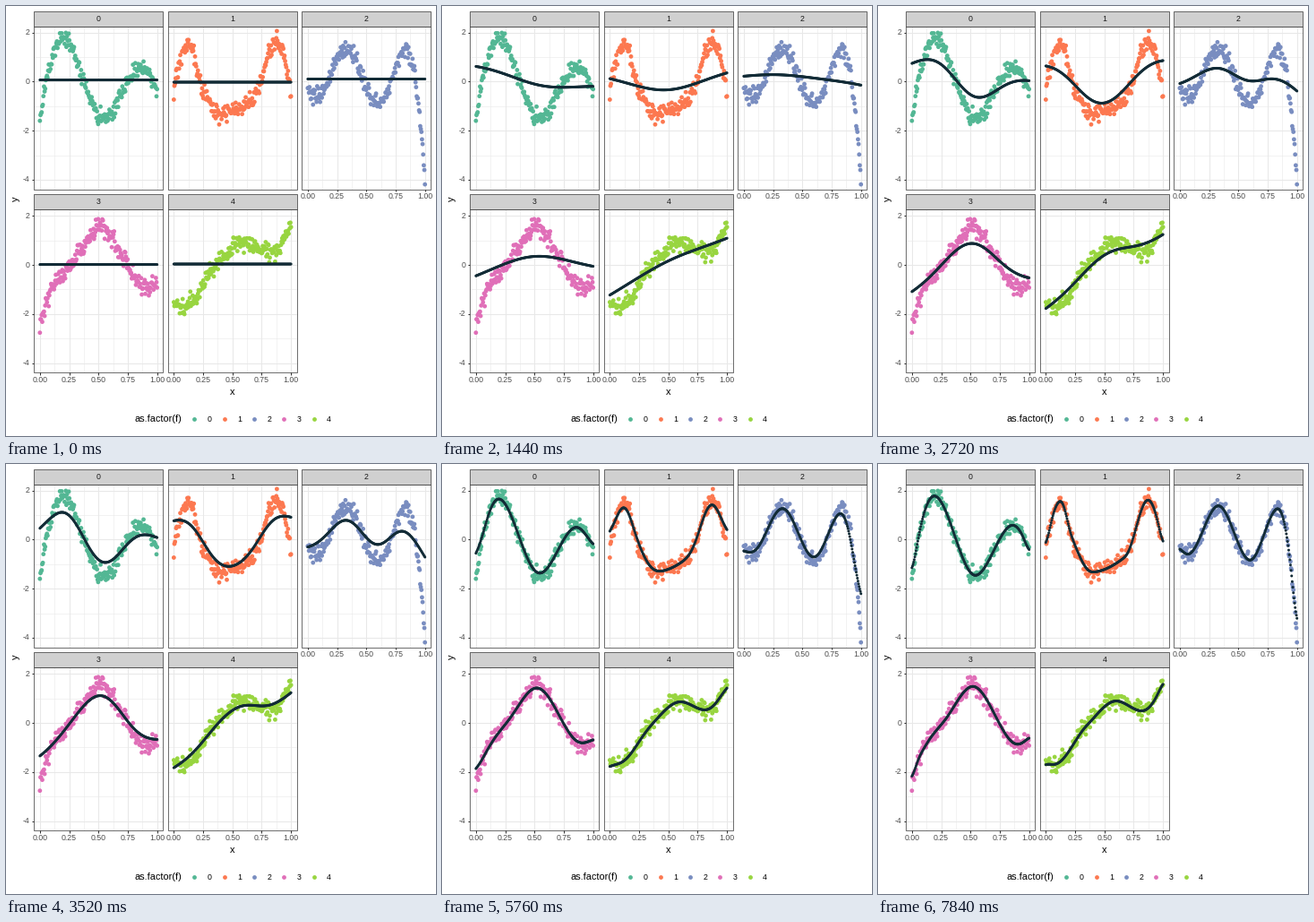
Write a matplotlib script that moves like this. It is 480x480 px and loops after 8000 ms.

```python
import numpy as np
import matplotlib.pyplot as plt
from matplotlib.animation import FuncAnimation
from matplotlib.patches import Rectangle

SIZE, DPI = 480, 100
PT = 72 / DPI                      # points per pixel
FRAMES, STEP = 50, 160
N = 200

LEFT, TOP = 31.3, 22.6             # first panel's corner
PANEL_W, PANEL_H, STRIP_H = 143.9, 181.9, 17.1
PITCH_X, PITCH_Y = 149.5, 204.7
UNIT_X, UNIT_Y = PANEL_W / 1.1, 27.4
ZERO_X, ZERO_Y = PANEL_W / 22, 61.7

INK, LABEL, GRID = "#333333", "#4d4d4d", "#e8e8e8"
STRIP, CURVE = "#d0d0d0", "#122b36"
COLORS = ["#53b794", "#fc7850", "#798dc0", "#e06fb8", "#98d540"]

plt.rcParams["font.family"] = "Liberation Sans"
rng = np.random.default_rng(7)
xs = np.linspace(0, 1, N)


def bend(*points):
    """Smooth curve that turns only at the given points."""
    kx, ky = np.array(points).T
    h = np.diff(kx)
    d = np.diff(ky) / h
    m = np.r_[2 * d[0], np.zeros(len(d) - 1), 2 * d[-1]]
    for i in range(1, len(d)):
        if d[i - 1] * d[i] > 0:
            m[i] = 2 / (1 / d[i - 1] + 1 / d[i])
    i = np.clip(np.searchsorted(kx, xs) - 1, 0, len(h) - 1)
    u = (xs - kx[i]) / h[i]
    ease = u * u * (3 - 2 * u)
    pull = h[i] * u * (1 - u) * ((1 - u) * m[i] - u * m[i + 1])
    return ky[i] + ease * (ky[i + 1] - ky[i]) + pull


signals = np.array([
    bend((0, -1.6), (.19, 1.8), (.54, -1.48), (.86, .6), (1, -.6)),
    bend((0, -.5), (.13, 1.62), (.22, .1), (.39, -1.33), (.68, -.7), (.87, 1.65), (1, -.45)),
    bend((0, -.3), (.07, -.62), (.33, 1.4), (.6, -.87), (.84, 1.3), (1, -4)),
    bend((0, -2.45), (.12, -.9), (.28, .1), (.52, 1.5), (.9, -.88), (1, -.55)),
    bend((0, -1.65), (.07, -1.7), (.35, -.1), (.6, .9), (.82, .48), (1, 1.7)),
])
clouds = signals + np.clip(rng.normal(0, 0.19, signals.shape), -0.42, 0.42)

means = signals.mean(axis=1, keepdims=True)
slopes, starts = np.polyfit(xs, signals.T, 1)
trends = starts[:, None] + slopes[:, None] * xs


def fits_at(t):
    """Learned curves at t seconds: flat, then coarse, then detailed."""
    width = 0.2 * np.exp((2.08 - t) / 2.4)
    kernel = np.exp(-0.5 * ((xs[:, None] - xs) / width) ** 2)
    kernel /= kernel.sum(axis=1, keepdims=True)
    coarse = trends + (signals - trends) @ kernel.T
    u = min(t / 2.08, 1)
    return means + u * u * (3 - 2 * u) * (coarse - means)


fig = plt.figure(figsize=(SIZE / DPI, SIZE / DPI), dpi=DPI, facecolor="white")
ax = fig.add_axes([0, 0, 1, 1])
ax.set_xlim(0, SIZE)
ax.set_ylim(SIZE, 0)
ax.axis("off")


def text(x, y, s, size=8.8, color="black", **kw):
    opts = dict(ha="center", va="center", zorder=6) | kw
    ax.text(x, y, s, fontsize=size * PT, color=color, **opts)


def line(x, y, color, width):
    ax.plot(x, y, color=color, lw=width * PT, solid_capstyle="butt", zorder=1)


def dots(x, y, color, size, z):
    # One colour per dot keeps the dots off the whole-pixel grid.
    return ax.scatter(x, y, s=(size * PT) ** 2, c=[color] * len(x), lw=0, zorder=z)


def box(x, y, w, h, fill, z):
    ax.add_patch(Rectangle((x, y), w, h, fc=fill, ec=INK, lw=0.7 * PT, zorder=z))


def draw_panel(k):
    """Draws one facet and returns its curve and its origin."""
    row, col = divmod(k, 3)
    left, top = LEFT + col * PITCH_X, TOP + row * PITCH_Y
    right, bottom = left + PANEL_W, top + PANEL_H
    x0, y0 = left + ZERO_X, top + ZERO_Y

    for i in range(9):
        x = x0 + i / 8 * UNIT_X
        line([x, x], [top, bottom], GRID, 0.55 if i % 2 else 1.07)
    for v in range(-4, 3):
        y = y0 - v * UNIT_Y
        line([left, right], [y, y], GRID, 0.55 if v % 2 else 1.07)

    if col == 0:
        for v in (2, 0, -2, -4):
            y = y0 - v * UNIT_Y
            line([left - 2.75, left], [y, y], INK, 1.07)
            text(left - 5, y, str(v), color=LABEL, ha="right")
    if k >= 2:
        for i in range(5):
            x = x0 + i / 4 * UNIT_X
            line([x, x], [bottom, bottom + 2.75], INK, 1.07)
            text(x, bottom + 8.4, f"{i / 4:.2f}", color=LABEL)

    px = x0 + xs * UNIT_X
    dots(px, y0 - clouds[k] * UNIT_Y, COLORS[k], 4.8, 2)
    curve = dots(px, np.full(N, y0), CURVE, 3, 3)
    box(left, top, PANEL_W, PANEL_H, "none", 4)
    box(left, top - STRIP_H, PANEL_W, STRIP_H, STRIP, 5)
    text((left + right) / 2, top - STRIP_H / 2, str(k), color="#1a1a1a")
    return curve, px, y0


panels = [draw_panel(k) for k in range(5)]

text(253, 431, "x", 11)
text(11, 215, "y", 11, rotation=90)
text(143, 461.5, "as.factor(f)", 11, ha="left")
for k, c in enumerate(COLORS):
    dots([210.3 + k * 33.3], [461], c, 4.8, 2)
    text(227 + k * 33.3, 461, str(k))


def update(frame):
    for (curve, px, y0), fit in zip(panels, fits_at(frame * STEP / 1000)):
        curve.set_offsets(np.column_stack([px, y0 - fit * UNIT_Y]))
    return [p[0] for p in panels]


anim = FuncAnimation(fig, update, frames=FRAMES, interval=STEP,
                     repeat=True, repeat_delay=0, blit=False)
plt.show()
```
